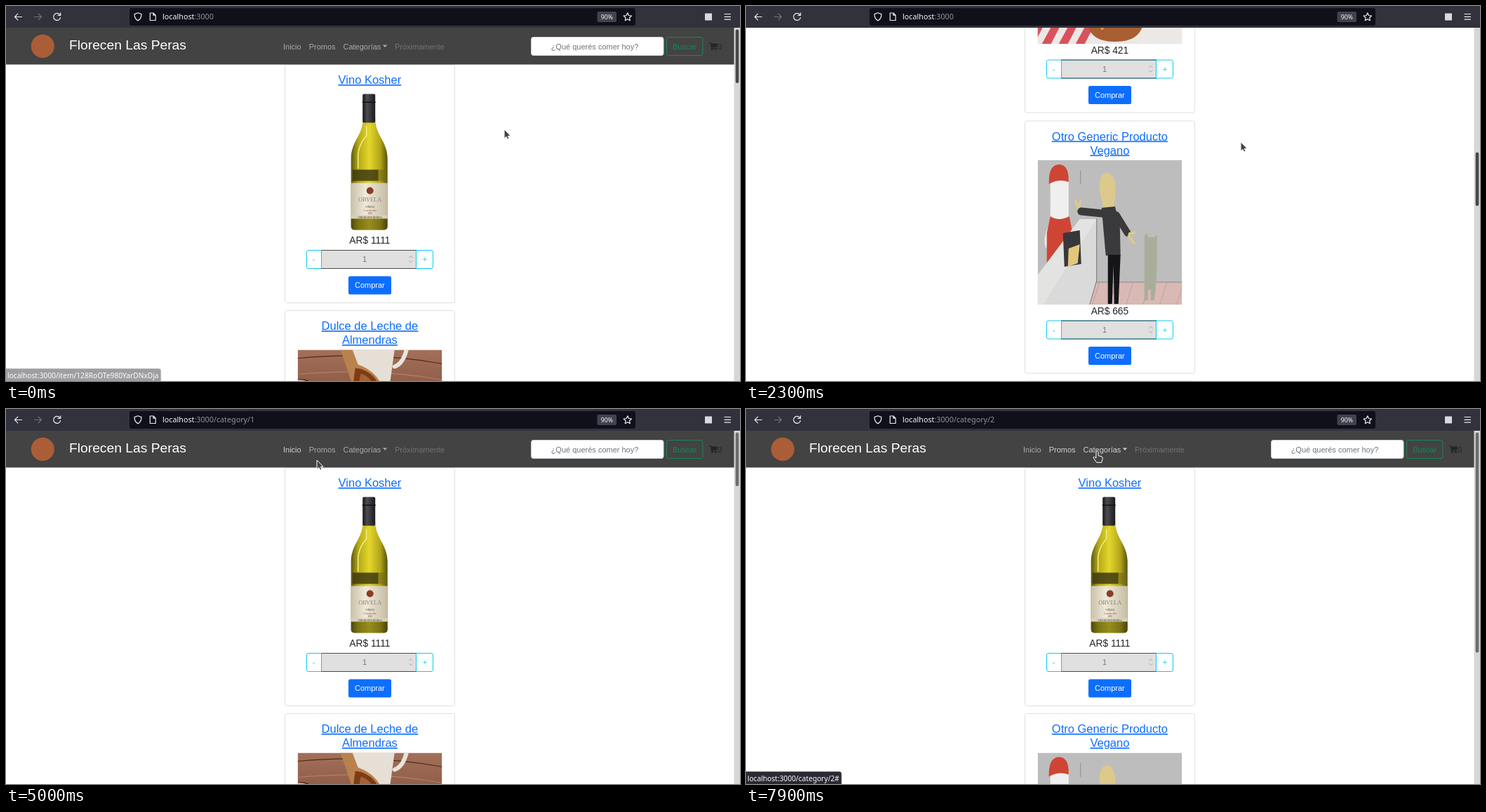
These frames come from a looping animation (1046 by 535 pixels, 8000 ms). An HTML page:

```html
<!DOCTYPE html>
<html lang="es">
<head>
<meta charset="utf-8">
<title>Tienda</title>
<style>
html, body { margin: 0; width: 100%; height: 100%; overflow: hidden; background: #fff; }
svg { display: block; }
#stage { width: 1046px; height: 535px; font: 11px "Liberation Sans", Arial, sans-serif; }
.ui { font-family: "Noto Sans", sans-serif; }
.mid { text-anchor: middle; }
.title { font-size: 16.5px; fill: #0d6efd; text-decoration: underline; text-anchor: middle; }
.price { font-size: 13.75px; fill: #212529; text-anchor: middle; }
.icon { fill: none; stroke: #ececf2; stroke-width: 1.2; stroke-linecap: round; stroke-linejoin: round; }
.cursor { fill: #444; stroke: #fff; stroke-width: 1; stroke-linejoin: round; }
</style>
</head>
<body>
<svg id="stage" viewBox="0 0 1046 535">
  <defs>
    <linearGradient id="glass">
      <stop offset="0" stop-color="#5c5a10"/><stop offset=".2" stop-color="#b5a916"/>
      <stop offset=".5" stop-color="#e3d62c"/><stop offset=".8" stop-color="#b3a51a"/>
      <stop offset="1" stop-color="#57520f"/>
    </linearGradient>
    <linearGradient id="foil">
      <stop offset="0" stop-color="#17171a"/><stop offset=".35" stop-color="#4b4b50"/><stop offset="1" stop-color="#1b1b1e"/>
    </linearGradient>
    <linearGradient id="paper">
      <stop offset="0" stop-color="#c9c1aa"/><stop offset=".4" stop-color="#efe9d9"/><stop offset="1" stop-color="#c6bda4"/>
    </linearGradient>
    <linearGradient id="wood" x2="0" y2="1">
      <stop offset="0" stop-color="#a3705a"/><stop offset=".45" stop-color="#7d4d38"/><stop offset="1" stop-color="#56301f"/>
    </linearGradient>
    <linearGradient id="caramel" x2="1" y2="1">
      <stop offset="0" stop-color="#bd6c2c"/><stop offset=".5" stop-color="#8a4115"/><stop offset="1" stop-color="#5a260b"/>
    </linearGradient>
    <linearGradient id="peach" x2="0" y2="1">
      <stop offset="0" stop-color="#f1d3a4"/><stop offset="1" stop-color="#e9bd8d"/>
    </linearGradient>
  </defs>
  <g id="page">
    <g id="cards"></g>
    <rect y="31" width="1038" height="52.5" fill="#434343"/>
    <circle cx="52.3" cy="57.3" r="16.6" fill="#ab5d37"/>
    <text x="90" y="61.5" font-size="19.25" fill="#fff">Florecen Las Peras</text>
    <g id="nav">
      <text x="395" y="61.5">Inicio</text>
      <text x="431.7" y="61.5">Promos</text>
      <g><text x="480.5" y="61.5">Categorías</text><path d="M536.8 55.6h6.4l-3.2 3.3z"/></g>
    </g>
    <text x="554" y="61.5" fill="#727272">Próximamente</text>
    <rect x="748.5" y="44.5" width="188.5" height="26" rx="3" fill="#fff" stroke="#ced4da"/>
    <text class="mid" x="839" y="61.5" fill="#6c757d">¿Qué querés comer hoy?</text>
    <rect x="941.5" y="44.5" width="51.5" height="26" rx="3" fill="none" stroke="#198754"/>
    <text class="mid" x="967" y="61.5" fill="#198754">Buscar</text>
    <path d="M1002 52h2.6l.5 1.6h9l-1.2 5.2h-6.6l.2 1h6.2v1.2h-7.4l-1.6-7.6h-1.7z" fill="#212529"/>
    <circle cx="1006" cy="62" r="1.2" fill="#212529"/><circle cx="1011.6" cy="62" r="1.2" fill="#212529"/>
    <text x="1014" y="61.5" fill="#212529">0</text>
  </g>
  <rect x="1037.5" y="31" width="8.5" height="504" fill="#d6d6d6"/>
  <rect id="thumb" x="1039.7" width="4.6" rx="2.3"/>

  <g class="ui">
    <rect width="1046" height="31" fill="#32323d"/>
    <rect x="176" y="3" width="721" height="25" rx="3" fill="#0f101a"/>
    <g class="icon">
      <path d="M22.5 15.5h-10m4.3-4.3-4.3 4.3 4.3 4.3"/>
      <path d="M40.5 15.5h10m-4.3-4.3 4.3 4.3-4.3 4.3" stroke="#73737d"/>
      <path d="M76.6 12.2a5 5 0 1 0 1 4.4M77.7 9.8v3.6h-3.6"/>
      <path d="M188 9.8l5 1.8c0 5-1.6 7.6-5 9.3-3.400-1.700-5-4.300-5-9.300z"/>
      <path d="M205.300 10h4.700l3.200 3.200v7.300h-7.900zM210 10v3.200h3.200"/>
      <path d="M885.800 9.800l1.700 3.700 4 .5-3 2.700.8 4-3.500-2-3.500 2 .8-4-3-2.700 4-.5z"/>
      <path d="M1024 11.500h8.500m-8.500 3.800h8.500m-8.500 3.800h8.500"/>
    </g>
    <rect x="996" y="10.500" width="10" height="10" fill="#d9d9e0"/>
    <rect x="842.500" y="8" width="27.500" height="15" rx="2" fill="#42424e"/>
    <text class="mid" x="856.300" y="18.700" font-size="8.700" fill="#f4f4f8">90%</text>
    <text x="223" y="19.200" font-size="10.750" fill="#f6f6fa">localhost<tspan id="url" fill="#92929d"></tspan></text>
    <g id="status">
      <path fill="#2b2a33" stroke="#55545f" stroke-width=".7"/>
      <text x="2" y="530.800" font-size="10.200" fill="#fbfbfe"></text>
    </g>
  </g>
  <path id="arrow" class="cursor" d="M0 0V13L3 10.500 4.800 14.300 7 13.300 5.300 9.600 9 9.200z"/>
  <path id="hand" class="cursor" d="M-1.600 1.500Q0-1.200 1.600 1.500V6.500L6.600 8Q8.200 8.600 7.700 10.600L6.300 16.300H-.800L-5 10.500Q-6 8.300-4 8.300L-1.600 10z"/>
</svg>
<script>
const LOOP = 8000, TOP = 31, FIRST = 83.5, GAP = 11.2;
const $ = id => document.getElementById(id);
const rect = (x, y, w, h, fill, more = '') =>
  `<rect x="${x}" y="${y}" width="${w}" height="${h}" fill="${fill}" ${more}/>`;
const oval = (x, y, rx, ry, fill, more = '') =>
  `<ellipse cx="${x}" cy="${y}" rx="${rx}" ry="${ry}" fill="${fill}" ${more}/>`;
const path = (d, fill, more = '') => `<path d="${d}" fill="${fill}" ${more}/>`;
const line = (d, color, width) =>
  path(d, 'none', `stroke="${color}" stroke-width="${width}" stroke-linecap="round"`);
const label = (y, size, text, fill) =>
  `<text class="mid" x="103" y="${y}" font-size="${size}" fill="${fill}" font-family="Liberation Serif, serif">${text}</text>`;
const repeat = (n, f) => Array.from({ length: n }, (_, i) => f(i)).join('');

const wine =
  path('M93 40H110.500C110.500 66 127.500 72 128 98V195Q128 200 122 200H82Q76 200 76 195V98C76.500 72 93 66 93 40Z', 'url(#glass)') +
  rect(92.500, 6, 18, 41, 'url(#foil)', 'rx="2"') +
  rect(92, 17, 19, 1.500, '#111') +
  line('M98 52V66Q88 76 86 92V112', '#f4ed8a', 1.500) +
  rect(78, 114, 37, 16, '#3f3a12', 'opacity=".85"') +
  rect(115, 114, 12, 16, '#746a18', 'opacity=".6"') +
  rect(76, 133, 52, 48, 'url(#paper)') +
  oval(103, 144, 5, 5, '#8a3d27') +
  label(159, 8.300, 'ORVELA', '#8d8577') +
  label(168, 3.500, 'VIÑEDO', '#4d463d') +
  label(173, 3.500, 'Cosecha alta', '#a3402c') +
  label(177.500, 3, '2010', '#4d463d') +
  rect(76, 179, 52, 5, '#d8d0b9') + label(183, 3, 'VINO BLANCO DE MESA', '#3b352c') +
  path('M76 184H128V195Q128 200 122 200H82Q76 200 76 195Z', '#38340d', 'opacity=".45"');

const jar =
  rect(0, 0, 206, 206, 'url(#wood)') +
  repeat(9, i => line(`M0 ${12 + i * 23}Q110 ${2 + i * 23} 206 ${20 + i * 23}`, i % 2 ? '#b08068' : '#4d2919', 1.200)) +
  path('M75 0H138L132 44Q128 66 105 64Q84 58 80 38Z', '#e6dfd6') +
  line('M138 24Q150 20 155 0', '#e9e3dc', 6) +
  path('M0 42Q18 40 24 54L27 85 22 182Q15 191 0 190Z', '#3d1a0c') +
  path('M0 72Q14 70 19 82V176Q10 184 0 184Z', '#6a2f12') +
  line('M0 44Q18 43 22 57M0 57Q16 55 21 66', '#c9bdb5', 2.500) + line('M23 70V160', '#a08a80', 1.500) +
  oval(163, 98, 32, 40, '#c8bdb6', 'opacity=".8" transform="rotate(-28 163 98)"') +
  oval(164, 89, 24, 29, '#ddd7d2', 'opacity=".75" transform="rotate(-28 164 89)"') +
  line('M138 105Q157 142 190 121', '#efebe8', 4) +
  path('M56 88Q58 61 101 60Q143 62 144 90L140 124 147 160 143 206H58Q52 172 60 142Z', '#a6978f') +
  path('M62 108Q100 93 140 108L145 162 140 206H64L57 172Z', 'url(#caramel)') +
  oval(100, 93, 43, 31, '#c8bcb5') + oval(100, 98, 38, 27, '#773712') +
  oval(100, 104, 33, 20, '#9b511f') +
  line('M58 111Q96 150 143 110M60 122Q100 162 142 122', '#d6cdc8', 3) +
  path('M61 0H78L86 21Q127 36 124 82Q119 110 106 108Q80 96 76 44Z', '#b9814d') +
  path('M82 26Q120 30 121 80Q117 105 106 104Q83 94 79 49Z', '#7e3c15') +
  path('M90 34Q112 40 111 75Q104 92 95 74Q84 55 90 34Z', '#b87647', 'opacity=".65"') +
  path('M99 104Q106 111 114 102L109 140H99Z', '#9d5020') +
  line('M44 206L52 160H68L72 180 58 206M53 164L66 206', '#b6aba5', 2.500) +
  line('M136 128Q139 146 134 168', '#e2d9d3', 2) +
  repeat(32, i => rect(180 + i * 17 % 25, 184 + i * 11 % 22, 1.800, 1.800, '#e8dfd8', 'opacity=".7"'));

const coco =
  rect(0, 0, 206, 206, 'url(#peach)') +
  path('M85 46L132 0H206V60L150 66Z', '#dfc7d0') +
  path('M112 42L150 8 206 0V54Z', '#eee7ec') +
  path('M0 148L70 120 206 132V206H0Z', '#ece8e6') +
  repeat(4, i => path(`M${i * 24 - 18} 206L${i * 24 + 18} 140H${i * 24 + 29}L${i * 24 - 5} 206Z`, '#d8525d')) +
  path('M62 78H158L150 178Q145 203 110 203Q76 203 71 178Z', '#a85f32') +
  oval(110, 78, 48, 20, '#c98b58') + oval(110, 79, 41, 15, '#7b3c17') +
  line('M82 104Q84 160 92 184', '#d69a6c', 4);

const scene =
  rect(0, 0, 206, 206, '#bdbdbd') +
  rect(0, 174, 206, 32, '#d9b9b4') +
  repeat(6, i => line(`M${88 + i * 24} 174l-10 32`, '#c39f9b', 1)) +
  line('M84 174H206', '#8e8787', 1) + line('M61 15V34', '#8d8d8d', 1) +
  path('M18 95Q10 112 14 124', 'none', 'stroke="#e9e9e9" stroke-width="6"') +
  rect(18, 18, 26, 78, '#efefef', 'rx="12"') +
  path('M16 34Q15 6 31 6Q45 7 44 31Q30 26 16 34Z', '#cf4535') +
  path('M18 80Q30 88 45 80L49 100V150H13V104Z', '#cf4535') +
  path('M0 164L60 84H84V170L74 206H0Z', '#dadada') +
  path('M0 164L60 84H84L8 206H0Z', '#e3e3e1') +
  line('M84 84V172L74 206', '#777', 1) +
  path('M36 104L60 100 62 148 38 152Z', '#38383a') + path('M44 126L60 120 57 147 43 152Z', '#e3c67c') +
  line('M58 74L54 57M57 75L61 58', '#ddc98b', 3) +
  line('M62 73L92 76', '#3a3a3d', 11) + line('M112 78L128 104', '#3a3a3d', 10) +
  line('M130 108L137 118M131 105L138 103', '#ddc98b', 4) +
  path('M88 42Q87 18 99 18Q112 20 111 48L108 70H94Z', '#ddc98b') +
  path('M91 68L110 66 117 90 118 136H97Z', '#3a3a3d') +
  path('M100 135H118L115 205H109L108 150 106 205H100Z', '#151517') +
  path('M152 108L155 104 158 110H166L170 106V150Q169 180 166 200H161V185H157V200H152Z', '#a9ae9b');

const ITEMS = {
  wine: { title: ['Vino Kosher'], price: 1111, pic: wine },
  jar: { title: ['Dulce de Leche de', 'Almendras'], price: 420, pic: jar },
  coco: { title: ['Dulce de Leche de Coco'], price: 421, pic: coco },
  scene: { title: ['Otro Generic Producto', 'Vegano'], price: 665, pic: scene },
  plain: { title: ['Generic Producto', 'Vegano'], price: 664, pic: rect(0, 0, 206, 206, '#b9c5aa') }
};
const PAGES = {
  home: { items: ['wine', 'jar', 'coco', 'scene', 'plain'], thumb: 76.500 },
  first: { items: ['jar', 'coco'], thumb: 210 },
  second: { items: ['wine', 'scene'], thumb: 314 }
};

function card({ title, price, pic }, top) {
  const y = Math.floor(top), img = y + 16.500 + 20 * title.length, end = img + 206;
  const text = (x, dy, s, fill) => `<text class="mid" x="${x}" y="${end + dy}" fill="${fill}">${s}</text>`;
  const box = (x, w, fill, stroke, more) => rect(x, Math.round(end) + 22.500, w, 26, fill, `stroke="${stroke}" ${more}`);
  return rect(397.500, y + .5, 242, 320 + 20 * title.length, '#fff', 'rx="3" stroke="#dfdfdf"') +
    title.map((s, i) => `<text class="title" x="518.400" y="${y + 28 + 20 * i}">${s}</text>`).join('') +
    `<svg x="415.700" y="${img}" width="205.500" height="206">${pic}</svg>` +
    `<text class="price" x="518.400" y="${end + 13.700}">AR$ ${price}</text>` +
    box(428.500, 24, '#fff', '#0dcaf0', 'rx="2.500"') + box(580.500, 28, '#fff', '#0dcaf0', 'rx="2.500"') +
    box(449.500, 135, '#e0e0e0', '#0dcaf0', '') +
    line(`M450 ${Math.round(end) + 22.500}H584m-134 26H584`, '#4a4a4a', 1) +
    text(438.500, 39.500, '-', '#0dcaf0') + text(597, 39.500, '+', '#0dcaf0') + text(511, 39.500, '1', '#7b7672') +
    line(`M574.500 ${end + 33.500}l2.300-2.300 2.300 2.300m-4.600 4.500l2.300 2.300 2.300-2.300`, '#a5a5a5', 1) +
    rect(488, Math.round(end) + 59.500, 61, 26, '#0d6efd', 'rx="2.500"') +
    text(518.400, 76.500, 'Comprar', '#fff');
}

for (const [name, page] of Object.entries(PAGES)) {
  let y = FIRST;
  const cards = page.items.map(key => {
    const html = card(ITEMS[key], y);
    y += 320 + 20 * ITEMS[key].title.length + GAP;
    return html;
  });
  $('cards').insertAdjacentHTML('beforeend', `<g id="${name}">${cards.join('')}</g>`);
}

// Each event overrides part of the state from its time on.
const EVENTS = [
  [0, { page: 'home', url: ':3000', scroll: 0, at: [710, 176], hand: false, hot: [], thumb: '#484848',
        status: ':3000/item/128RoOTe980YarDNxDja', fade: .45 }],
  [100, { status: '', fade: 1, at: [709, 177] }],
  [300, { at: [705, 178] }],
  [500, { at: [704, 175] }],
  [600, { at: [703, 175] }],
  [900, { scroll: 24, at: [701, 176] }],
  [1000, { scroll: 96 }],
  [1100, { scroll: 190 }],
  [1200, { scroll: 262 }],
  [1300, { scroll: 289.500 }],
  [1600, { scroll: 390 }],
  [1700, { scroll: 450 }],
  [2000, { scroll: 540, at: [703, 184] }],
  [2100, { scroll: 690, at: [704, 188] }],
  [2200, { scroll: 850, at: [705, 192] }],
  [2300, { scroll: 993.500, at: [705, 194] }],
  [2400, { scroll: 1058 }],
  [2500, { scroll: 1080 }],
  [3200, { scroll: 304, at: [661, 202] }],
  [3400, { scroll: 130, at: [540, 186] }],
  [3600, { scroll: 0, at: [332, 138] }],
  [3800, { at: [352, 109] }],
  [3900, { at: [373, 83] }],
  [4100, { at: [424, 64] }],
  [4300, { at: [405, 59], hand: true, hot: [0], status: ':3000/category/1', fade: .8 }],
  [4500, { fade: 1, thumb: '#6c6c6c' }],
  [4800, { url: ':3000/category/1' }],
  [5000, { at: [443, 73], hand: false, status: '' }],
  [5200, { page: 'first' }],
  [5500, { at: [451.500, 58], hand: true, hot: [0, 1], status: ':3000/category/2' }],
  [6500, { page: 'second', url: ':3000/category/2', hot: [1] }],
  [6800, { scroll: 150, status: '', hand: false, at: [449, 60] }],
  [6900, { scroll: 265 }],
  [7100, { scroll: 298 }],
  [7600, { scroll: 0, hand: true, at: [453, 60] }],
  [7900, { at: [500.500, 60], hot: [1, 2], status: ':3000/category/2#' }]
];

const show = (el, on) => el.setAttribute('display', on ? 'inline' : 'none');
const nav = [...$('nav').children];
const [tip, tipText] = $('status').children;

function draw(t) {
  const s = Object.assign({}, ...EVENTS.filter(e => e[0] <= t).map(e => e[1]));
  for (const name in PAGES) show($(name), name === s.page);
  $('page').setAttribute('transform', `translate(0 ${-s.scroll})`);
  $('thumb').setAttribute('y', TOP + 2.500 + s.scroll * .1765);
  $('thumb').setAttribute('height', PAGES[s.page].thumb);
  if (s.page === 'second') $('thumb').setAttribute('y', TOP + 2.500 + s.scroll * .62);
  $('thumb').setAttribute('fill', s.thumb);
  nav.forEach((el, i) => el.setAttribute('fill', s.hot.includes(i) ? '#d0d0d0' : '#aaa'));
  $('url').textContent = s.url;

  show($('status'), s.status);
  if (s.status) {
    tipText.textContent = 'localhost' + s.status;
    const w = tipText.getComputedTextLength() + 5;
    tip.setAttribute('d', `M-1 517.500H${w - 3}q3 0 3 3V536H-1Z`);
    $('status').setAttribute('opacity', s.fade);
  }
  for (const id of ['arrow', 'hand']) {
    show($(id), s.hand === (id === 'hand'));
    $(id).setAttribute('transform', `translate(${s.at})`);
  }
}

const start = performance.now();
function tick() {
  draw((performance.now() - start) % LOOP);
  requestAnimationFrame(tick);
}
tick();
</script>
</body>
</html>
```
